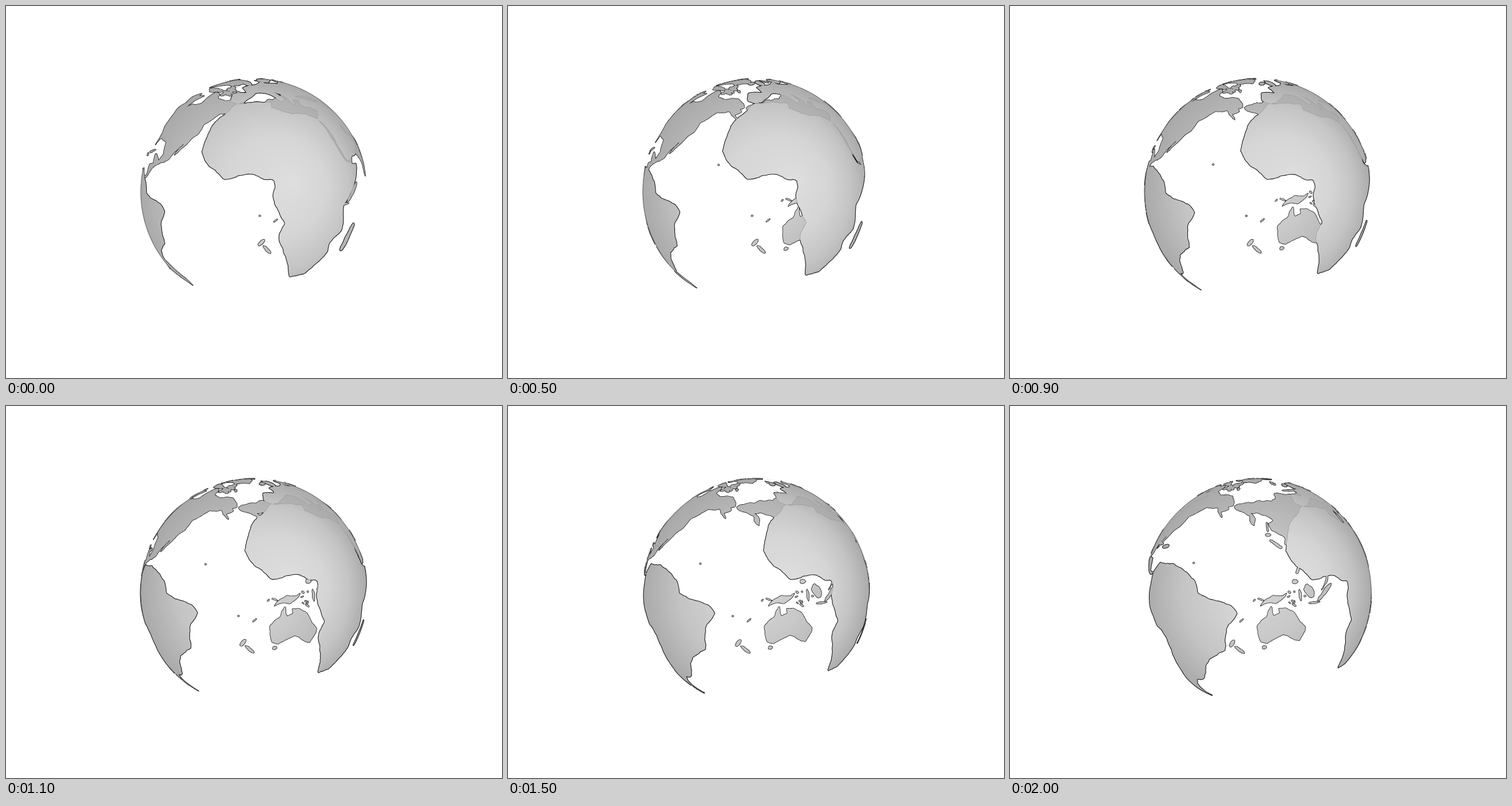
Write an HTML page that moves like this. It is 864 by 648 pixels and loops after 2.1 s.

```html
<!DOCTYPE html>
<html lang="en">
<head>
<meta charset="utf-8">
<title>Transparent globe</title>
<style>
html, body { margin: 0; width: 100%; height: 100%; overflow: hidden; background: #fff; }
svg { display: block; width: 100%; height: 100%; }
</style>
</head>
<body>
<svg viewBox="0 0 864 648">
  <defs>
    <radialGradient id="nearTone" gradientUnits="userSpaceOnUse" cx="432" cy="324" r="198" fx="500" fy="305">
      <stop offset="0" stop-color="#dedede"/>
      <stop offset=".45" stop-color="#d5d5d5"/>
      <stop offset=".75" stop-color="#c4c4c4"/>
      <stop offset="1" stop-color="#a9a9a9"/>
    </radialGradient>
    <radialGradient id="farTone" gradientUnits="userSpaceOnUse" cx="432" cy="324" r="198">
      <stop offset="0" stop-color="#d4d4d4"/>
      <stop offset=".4" stop-color="#c9c9c9"/>
      <stop offset=".8" stop-color="#b3b3b3"/>
      <stop offset="1" stop-color="#a8a8a8"/>
    </radialGradient>
    <clipPath id="farClip"><path class="farLand"/></clipPath>
    <clipPath id="landClip"><path class="farLand"/><path class="nearLand"/></clipPath>
  </defs>
  <g fill="none" stroke="#1a1a1a" stroke-linejoin="round">
    <path class="farCoast" stroke-width="1.6"/>
    <path class="nearCoast" stroke-width="2.2"/>
  </g>
  <path class="farLand" fill="url(#farTone)"/>
  <path class="nearCoast" fill="none" stroke="#a0a0a0" stroke-width="1.8" clip-path="url(#farClip)"/>
  <path class="nearLand" fill="url(#nearTone)"/>
  <circle cx="432" cy="324" r="197.4" fill="none" stroke="#555" clip-path="url(#landClip)"/>
</svg>
<script>
const CX = 432, CY = 324, LIMB = 197.6, DISTANCE = 2.7;
const FOCAL = LIMB * Math.sqrt(DISTANCE ** 2 - 1);
const STEP_MS = 100, STEPS = 21, START_LON = 2.5, STEP_DEG = 1.5;
const RAD = Math.PI / 180;

let seed = 7;
function random(low, high) {
  seed = (seed * 16807) % 2147483647;
  return low + (high - low) * seed / 2147483647;
}

const parse = text => text.split(",").map(group => group.trim().split(" ").map(Number));

// Key capes and bays as "lon lat", clockwise; the coast between them is generated.
const africa = `32.5 30,37 21,43 12.2,51.2 11.9,47.5 4,39.5 -5,40.7 -15,35 -20,35.4 -24,32.5 -28,27 -33.7,
20 -34.8,18.2 -32,14.5 -23,11.8 -16,13.6 -11,9.2 -2,9.6 3.8,6 4.4,2 6.2,-7.6 4.4,-13.2 8.8,-17.2 14.5,
-16.3 19.5,-13 27.7,-9.7 31,-5.9 35.8,3 36.9,10.5 37,10.5 33.8,15.5 32,20 31,25 31.7`;
const europe = `32.5 30,35.8 35,30.6 36.5,27 37,26.5 40.5,23 40,23 36.6,19.5 41.5,13.2 45.5,18.3 40,16 38,
11 42.5,4 43.3,-.3 39,-2.2 36.8,-5.5 36.1,-9 38,-9 43.2,-1.7 43.6,-4.5 48.4,4 52,8.3 57,11 54.2,20.5 55,
23.5 59.2,29 60,22 61,24.5 65.5,17.5 62,13 55.5,6 58.3,5.5 62.3,15 68.5,27 71`;
const asia = `41 67,34 64.8,44 67.5,67 70,87 75,104 77.6,113 73.7,140 72.5,180 69.2,190 66,177 62.5,163 59,
162 55,156.8 51,156 57,162 61.5,142 59.2,135.3 54.8,141 52.5,139 47,130 42.5,127.5 39.5,129 35.5,126.4 34.7,
125 39.6,118 39,122 37,119.5 35,121.8 31,119 25.5,110 21,106 19.5,109 13,105 9,100.5 13.3,99.5 9,103.8 1.4,
98.4 8,97 17,92 21.5,87 21.3,80 15,79.8 10,77.5 8,73 17,70 21,66 25.2,57 26.3,49 30,51.5 25,56 25.5,
59.5 22.5,54 16.5,44 12.7,39 21.3,34.5 28.5`;
const northAmerica = `-167 66,-157 71.2,-128 70,-108 68,-94 70.5,-82 69,-87 65,-94 59.5,-82.5 55,-79.5 51.5,
-77 57,-77.5 62.3,-69 59,-64.5 60,-56 52.5,-66 50.2,-61 46,-66 43.8,-70.5 42.5,-75.5 36,-81 31.5,-80.3 25.5,
-84 30,-94 29.5,-97.5 22.5,-94.5 18.3,-90 21,-87 21,-88.5 16,-83.3 15,-82 9.3,-77.3 8.3,-80.5 7.5,-86 11,
-95 16,-105.5 20.5,-109.5 26,-114.5 31.3,-109.5 23.3,-115 29,-124 40.5,-124 47.5,-134 58,-147 60.8,
-152 59.5,-164 54.8,-158 58.6,-165 62,-161.5 64.3`;
const southAmerica = `-77.3 8.3,-72 12,-62 10.6,-51.5 4.5,-49.5 -.5,-44 -2.7,-37 -4.8,-34.9 -7.5,-39 -13,
-40.5 -21.5,-48.3 -26,-53 -33.5,-57.7 -38.2,-62.2 -39.2,-65 -42,-67.3 -46,-69 -51.5,-67 -55,-74.5 -51,
-73.5 -40,-70.3 -19,-76.2 -14,-81.2 -5,-80 1`;
const australia = `142.5 -10.8,146 -18.8,153.2 -26,150 -37.4,144 -38.6,138 -35,131 -31.5,124 -33.5,116 -34.8,
113.7 -25,121.5 -18.5,126 -14,130.8 -12,136.6 -12.2,135.8 -15.2,140.5 -17.5`;
const newGuinea = "131 -.8,135 -3,141 -2.6,147 -6,150.5 -10.4,144 -7.8,138.5 -8.2,133 -4";
const greenland = "-70 78,-35 83.5,-19 79,-24 70,-40 65,-45 60,-53 66.5,-57 75";

// Islands as "lon lat length width tilt", each a rough ellipse.
const islands = `175.8 -38.3 3 1.2 -50,170 -43.8 4 1.1 45,146.6 -42 1.4 1.2 0,178 -17.8 .6 .5 0,
165.6 -21.2 1.8 .4 -40,155.3 -6.2 .9 .4 -50,150.5 -5.5 2.4 .5 20,114 1 5.2 3.2 45,101 0 7.8 1.4 -47,
110 -7.3 4.6 .7 -8,120.7 -2.2 3.8 .8 80,121.5 16 3 1 -65,124.5 7.5 2 1.4 0,125.3 -9.3 2 .5 30,
-155.6 19.6 .6 .5 0,137 36 6 1.1 40,143 43.3 2 1.3 0,142.8 50 4 .6 90,47 -18.8 7 2 72,
-2.5 54 4 1.4 110,-8 53.3 1.8 1.3 70,-18.7 65 2.7 1.5 0,-79.5 21.7 5 .6 -18,-71.3 18.9 2.6 .8 0,
-72 68.5 7 2 -40,59 73.5 5 .9 50`;
const inlandSeas = "35 43.3 6 1.5 0,51 42 5.2 1.7 110";

// Each pass adds smoothly placed midpoints, shifted a little to roughen the shore.
function roughen(points, passes) {
  for (let pass = 0; pass < passes; pass++) {
    const at = i => points[(i + points.length) % points.length];
    points = points.flatMap((p, i) => {
      const q = at(i + 1), before = at(i - 1), after = at(i + 2);
      const shift = random(-.07, .07);
      const mid = axis => (17 * (p[axis] + q[axis]) - before[axis] - after[axis]) / 32;
      return [p, [mid(0) + shift * (q[1] - p[1]), mid(1) - shift * (q[0] - p[0])]];
    });
  }
  return points;
}

function ellipse([lon, lat, length, width, tilt]) {
  const cos = Math.cos(tilt * RAD), sin = Math.sin(tilt * RAD);
  return Array.from({ length: 8 }, (_, i) => {
    const angle = -i * Math.PI / 4, size = random(.8, 1.15);
    const u = length * size * Math.cos(angle), v = width * size * Math.sin(angle);
    return [lon + (u * cos - v * sin) / Math.cos(lat * RAD), lat + u * sin + v * cos];
  });
}

const scatter = (count, west, east, south, north, size) => Array.from({ length: count }, () =>
  [random(west, east), random(south, north), size * random(.7, 1.6), size * random(.3, .7), random(-40, 40)]);

const mainlands = [africa, europe + "," + asia, northAmerica, southAmerica, australia, newGuinea, greenland];
const smallLands = [
  ...parse(islands),
  ...scatter(18, -122, -72, 70.5, 80, 1.9),
  ...scatter(8, 117, 130, -9, 1, .8),
  ...scatter(4, 10, 28, 78, 80, 1.2)
];
const coasts = [
  ...mainlands.map(text => roughen(parse(text), 4)),
  ...smallLands.map(island => roughen(ellipse(island), 2)),
  ...parse(inlandSeas).map(sea => roughen(ellipse(sea), 2).reverse())
].map(coast => coast.map(([lon, lat]) =>
  ({ lon: lon * RAD, flat: Math.cos(lat * RAD), y: Math.sin(lat * RAD) })));

function project({ lon, flat, y }, camera) {
  const x = flat * Math.sin(lon - camera), z = flat * Math.cos(lon - camera);
  const place = scale => (CX + x * scale).toFixed(1) + " " + (CY - y * scale).toFixed(1);
  return {
    near: z > 1 / DISTANCE,
    point: place(FOCAL / (DISTANCE - z)),
    limb: place(LIMB / Math.hypot(x, y))
  };
}

// Points on the other side slide to the limb, so cut-off land closes along it.
function tracePaths(rings, near) {
  let land = "", coast = "";
  for (const ring of rings) {
    if (!ring.some(p => p.near === near)) continue;
    land += "M" + ring.map(p => p.near === near ? p.point : p.limb).join("L") + "Z";
    let drawing = false;
    for (const p of [...ring, ring[0]]) {
      if (p.near === near) coast += (drawing ? "L" : "M") + p.point;
      drawing = p.near === near;
    }
  }
  return { land, coast };
}

function setPath(name, d) {
  document.querySelectorAll("." + name).forEach(path => path.setAttribute("d", d));
}

function draw(step) {
  const camera = (START_LON - STEP_DEG * step) * RAD;
  const rings = coasts.map(coast => coast.map(p => project(p, camera)));
  for (const side of ["near", "far"]) {
    const { land, coast } = tracePaths(rings, side === "near");
    setPath(side + "Land", land);
    setPath(side + "Coast", coast);
  }
}

let shown = -1;
const start = performance.now();
function tick() {
  const step = Math.floor((performance.now() - start) / STEP_MS) % STEPS;
  if (step !== shown) draw(shown = step);
  requestAnimationFrame(tick);
}
tick();
</script>
</body>
</html>
```
